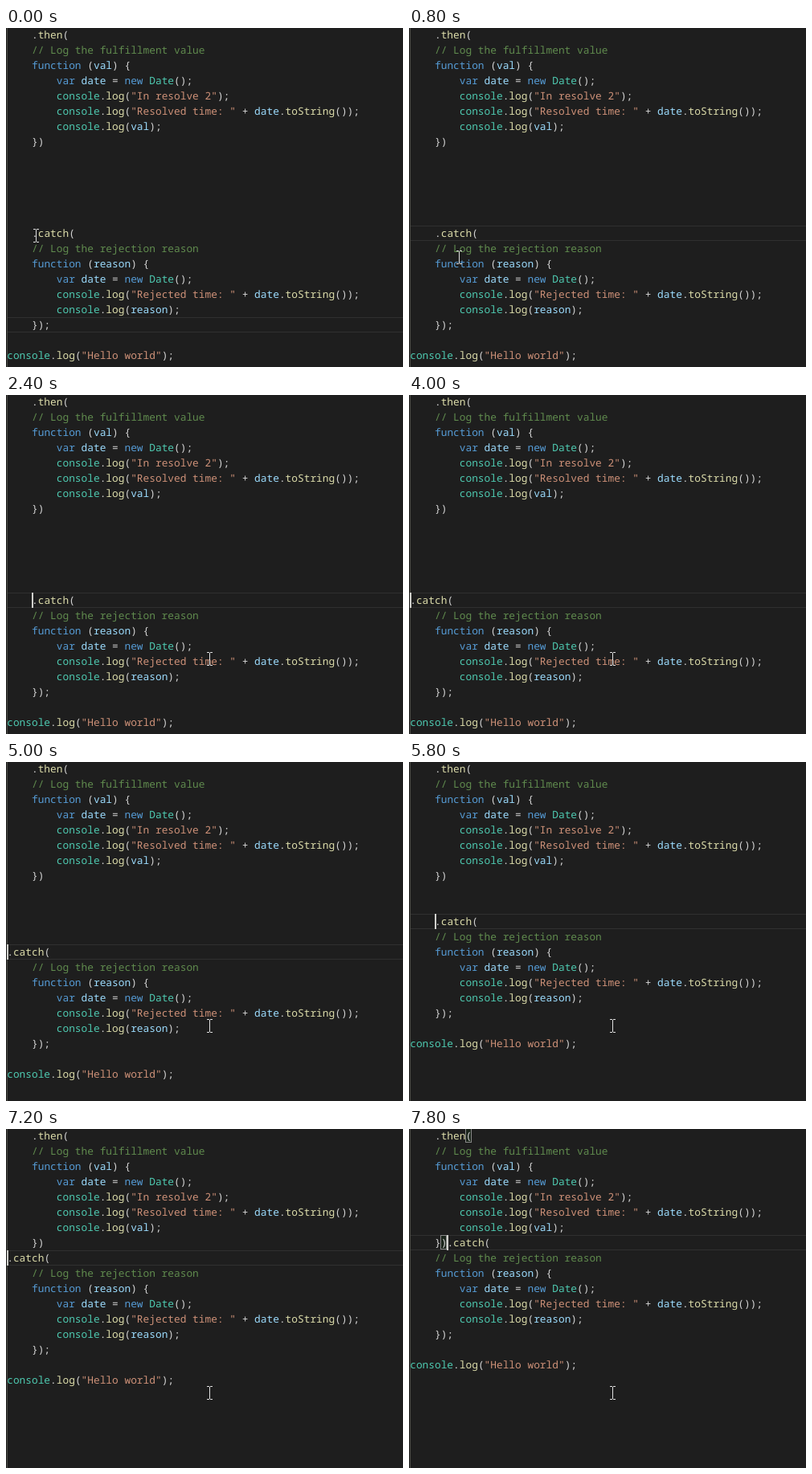
An HTML page for the animation above (8000 ms loop, 494x422 px).

```html
<!DOCTYPE html>
<html lang="en">
<head>
<meta charset="utf-8">
<title>Joining a promise chain</title>
<style>
html, body { margin: 0; width: 100%; height: 100%; overflow: hidden; background: #1e1e1e; }
body { position: relative; }
pre, div, svg { position: absolute; margin: 0; }
pre {
  left: 1.2px;
  font: 12.83px/19px "Noto Sans Mono", "DejaVu Sans Mono", monospace;
  text-rendering: geometricPrecision;
  font-variant-ligatures: none;
  color: #d4d4d4;
}
#edge { left: 1px; top: 0; width: 1px; height: 100%; background: #4c4c46; }
#row { left: 2px; right: 0; height: 19px; box-sizing: border-box; border: solid #303030; border-width: 1px 0; }
#caret { width: 2px; height: 19px; background: #d0d0cc; }
.match { width: 8px; height: 18px; box-sizing: border-box; border: 1px solid #888; background: rgba(0, 100, 0, .1); }
.keyword { color: #569cd6; }
.comment { color: #608b4e; }
.string { color: #ce9178; }
.type { color: #4ec9b0; }
.call { color: #dcdcaa; }
.name { color: #9cdcfe; }
</style>
</head>
<body>
<div id="edge"></div>
<div id="row"></div>
<div class="match" style="left:70px;top:-1px"></div>
<div class="match" style="left:39px;top:132px"></div>
<pre id="head">
    .then(
    // Log the fulfillment value
    function (val) {
        var date = new Date();
        console.log("In resolve 2");
        console.log("Resolved time: " + date.toString());
        console.log(val);
    })</pre>
<pre id="link">.catch(</pre>
<pre id="tail">
    // Log the rejection reason
    function (reason) {
        var date = new Date();
        console.log("Rejected time: " + date.toString());
        console.log(reason);
    });

console.log("Hello world");</pre>
<div id="caret"></div>
<svg id="mouse" width="9" height="17" fill="none" stroke="#e0e0e0">
  <path d="M1 .5H4M5 .5H8M4.5 1V16M1 16.5H4M5 16.5H8"/>
</svg>
<script>
const LOOP = 8000, TICK = 200, LINE = 19, CHAR = 7.7;
const $ = id => document.getElementById(id);
const matches = document.querySelectorAll('.match');
const rowTop = row => row * LINE - 1;

// time, row and column of the link line after each key press
const edits = [
  [0, 13, 4], [300, 13, 4], [4000, 13, 0], [4400, 12, 4], [5000, 12, 0],
  [5200, 11, 4], [5600, 11, 0], [5800, 10, 4], [6000, 10, 0], [6200, 9, 4],
  [6600, 9, 0], [7000, 8, 4], [7200, 8, 0], [7800, 7, 6]
];
// time, x, y
const path = [[0, 37, 258], [400, 37, 258], [1400, 107, 336], [1600, 107, 336], [2400, 253, 328], [LOOP, 253, 328]];

const kinds = [
  ['comment', /^\/\//], ['string', /^"/], ['keyword', /^(function|var|new)$/],
  ['type', /^(console|Date)$/], ['call', /^(then|catch|log|toString)$/], ['name', /^\w/]
];
function paint(pre) {
  pre.innerHTML = pre.textContent.replace(/\/\/.*|"[^"]*"|\w+/g, word => {
    const kind = kinds.find(([, test]) => test.test(word))[0];
    return `<span class="${kind}">${word}</span>`;
  });
}
document.querySelectorAll('pre').forEach(paint);
$('head').style.top = rowTop(0) + 'px';

function place(el, x, y) {
  el.style.left = x + 'px';
  el.style.top = y + 'px';
}

function mouseAt(t) {
  const i = path.findIndex(p => p[0] > t);
  const [t0, x0, y0] = path[i - 1], [t1, x1, y1] = path[i];
  const k = (t - t0) / (t1 - t0), e = k * k * (3 - 2 * k);
  return [x0 + (x1 - x0) * e, y0 + (y1 - y0) * e];
}

function draw(now) {
  const t = Math.floor(now % LOOP / TICK) * TICK;
  const [since, row, col] = edits.filter(e => e[0] <= t).pop();
  const clicked = since > 0, joined = row === 7;

  place($('link'), 1.2 + col * CHAR, rowTop(row));
  $('tail').style.top = rowTop(row + 1) + 'px';
  $('row').style.top = rowTop(clicked ? row : 19) + 'px';
  place($('caret'), Math.round(1.2 + col * CHAR), rowTop(row));
  $('caret').hidden = !clicked || (t - since) % 1000 >= 500;
  matches.forEach(m => m.hidden = !joined);

  const [x, y] = mouseAt(t);
  place($('mouse'), Math.round(x) - 4, Math.round(y) - 8);
  requestAnimationFrame(draw);
}
requestAnimationFrame(draw);
</script>
</body>
</html>
```
